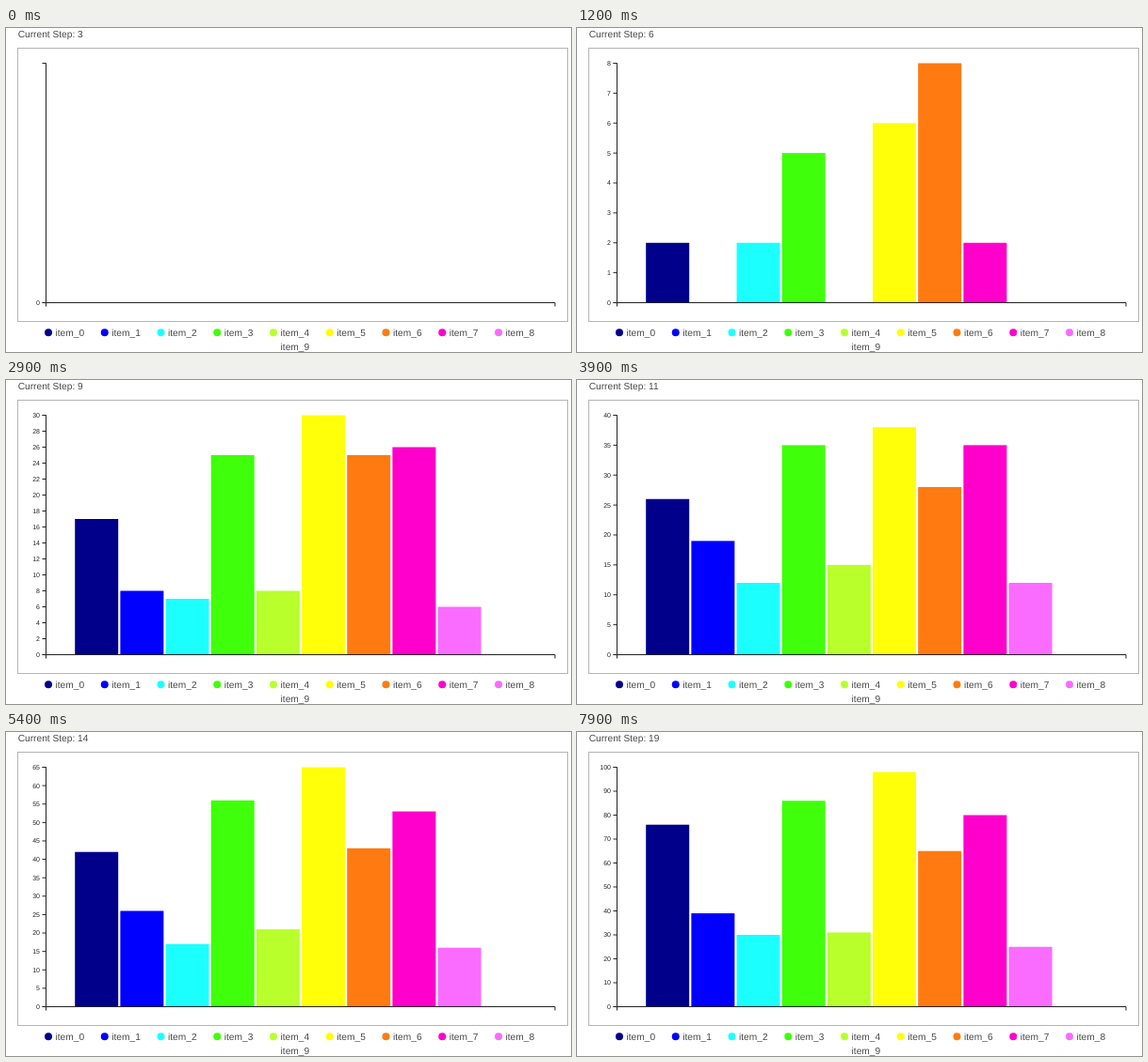
An HTML page for the animation above (8000 ms loop, 600 by 345 pixels).

```html
<!DOCTYPE html>
<html lang="en">
<head>
<meta charset="utf-8">
<title>Bar chart by step</title>
<style>
  html, body { margin: 0; width: 100%; height: 100%; overflow: hidden; background: #fff; }
  svg { display: block; width: 600px; height: 345px; }
  text { font-family: "Liberation Sans", Arial, sans-serif; text-rendering: geometricPrecision; }
  .label { font-size: 10.2px; fill: #484848; }
  .ticks text { font-size: 7px; fill: #222; text-anchor: end; }
  .axis, .ticks path { fill: none; stroke: #222; stroke-width: 1; }
  .frame { fill: none; stroke: #b4b4b4; }
</style>
</head>
<body>
<svg viewBox="0 0 600 345">
  <text class="label" id="step" x="12.7" y="10"></text>
  <rect class="frame" x="12.5" y="21.5" width="584" height="291"/>
  <g id="bars"></g>
  <path class="axis" d="M38.5 37.5H42.5V292.5H38.5M42.5 296.5V292.5H583V296.5"/>
  <g class="ticks" id="ticks"></g>
  <g id="legend"></g>
</svg>
<script>
const LOOP = 8000, FRAME = 100, BASE = 292.5, HEIGHT = 255;
const COLORS = ['#00008b', '#0000ff', '#1cffff', '#40ff0a', '#b8ff2c',
                '#ffff0a', '#ff7a10', '#ff00cc', '#f96cff'];

const EMPTY = Array(9).fill(0);
const COUNTS = [
  [2, 0, 2, 5, 0, 6, 8, 2, 0],
  [17, 8, 7, 25, 8, 30, 25, 26, 6],
  [26, 19, 12, 35, 15, 38, 28, 35, 12],
  [42, 26, 17, 56, 21, 65, 43, 53, 16],
  [53, 31, 20, 67, 24, 74, 50, 60, 22],
  [76, 39, 30, 86, 31, 98, 65, 80, 25]
];
// [start, end] of the transitions leading to each row of COUNTS
const SPANS = [
  [[0, 450], [450, 900]],
  [[1300, 1800], [1850, 2350], [2400, 2900]],
  [[2900, 3400], [3400, 3900]],
  [[4000, 4500], [4600, 5000], [5000, 5400]],
  [[5400, 5900], [5900, 6400]],
  [[6400, 7000], [7300, 7900]]
];

const $ = id => document.getElementById(id);
const mix = (a, b, k) => a + (b - a) * k;
const ease = k => k < .5 ? 4 * k ** 3 : 1 - 4 * (1 - k) ** 3;

function tickSize(max) {
  const raw = max / 10, power = 10 ** Math.floor(Math.log10(raw)), rest = raw / power;
  const factor = rest >= Math.sqrt(50) ? 10 : rest >= Math.sqrt(10) ? 5 : rest >= Math.SQRT2 ? 2 : 1;
  return Math.max(1, factor * power);
}

function makeState(values) {
  const max = Math.max(...values);
  if (!max) return { values, scale: 0, ticks: [0] };
  const size = tickSize(max), count = Math.ceil(max / size);
  return {
    values,
    scale: HEIGHT / (count * size),
    ticks: Array.from({ length: count + 1 }, (_, i) => i * size)
  };
}

const moves = [];
let last = makeState(EMPTY);
SPANS.forEach((spans, row) => {
  const from = last.values;
  spans.forEach(([start, end], i) => {
    const part = (i + 1) / spans.length;
    const to = makeState(from.map((v, j) => Math.round(mix(v, COUNTS[row][j], part))));
    moves.push({ start, end, from: last, to });
    last = to;
  });
});

$('bars').innerHTML = COLORS.map((color, i) =>
  `<rect x="${73.2 + i * 48.17}" width="46" fill="${color}"/>`).join('');
$('legend').innerHTML = COLORS.map((color, i) => {
  const x = 45 + i * 59.75;
  return `<circle cx="${x}" cy="324.3" r="4" fill="${color}"/>
    <text class="label" x="${x + 7.5}" y="328">item_${i}</text>`;
}).join('') + '<text class="label" x="291.6" y="342.5">item_9</text>';
const bars = [...$('bars').children];

function draw(time) {
  const move = moves.filter(m => m.start <= time).pop();
  const { from, to } = move;
  const k = ease(Math.min(1, (time - move.start) / (move.end - move.start)));

  bars.forEach((bar, i) => {
    const h = mix(from.values[i] * from.scale, to.values[i] * to.scale, k);
    bar.setAttribute('y', BASE - h);
    bar.setAttribute('height', h);
  });

  const scale = mix(from.scale, to.scale, k);
  const all = [...new Set([...from.ticks, ...to.ticks])];
  $('ticks').innerHTML = all.map(v => {
    const opacity = mix(+from.ticks.includes(v), +to.ticks.includes(v), k);
    const y = BASE - v * scale;
    if (!opacity || y < 22) return '';
    return `<g opacity="${opacity}"><path d="M38.5 ${y}H42.5"/><text x="36" y="${y + 2.4}">${v}</text></g>`;
  }).join('');

  $('step').textContent = 'Current Step: ' + (3 + Math.floor((time + 300) / 500));
}

const begin = performance.now();
let shown = -1;
function tick() {
  const elapsed = Math.max(0, performance.now() - begin) % LOOP;
  const time = Math.floor(elapsed / FRAME) * FRAME;
  if (time !== shown) draw(shown = time);
  requestAnimationFrame(tick);
}
tick();
</script>
</body>
</html>
```
